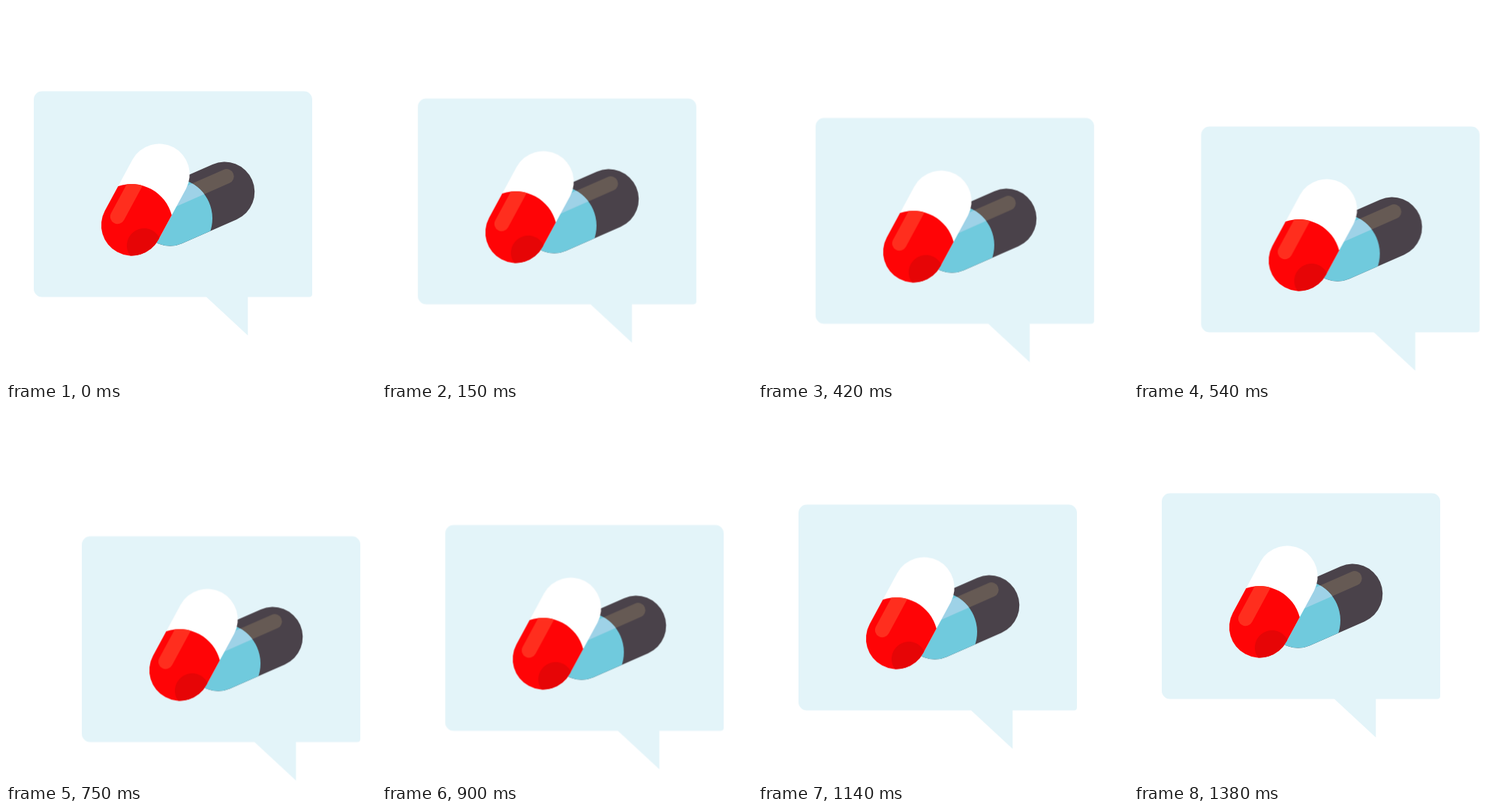
These frames come from a looping animation (493x498 px, 1.5 s). An HTML page:

```html
<!DOCTYPE html>
<html lang="en">
<head>
<meta charset="utf-8">
<title>Capsules</title>
<style>
  html, body {
    margin: 0;
    width: 100%;
    height: 100%;
    overflow: hidden;
    background: #fff;
  }
  svg {
    display: block;
    width: 493px;
    height: 498px;
  }
  .bubble {
    animation: drift 1500ms infinite;
  }
  /* out until 715 ms, back by 1380 ms, then rest */
  @keyframes drift {
    0% {
      transform: translate(0, 0);
      animation-timing-function: cubic-bezier(.167, 0, .833, 1);
    }
    47.667% {
      transform: translate(65.6px, 58.7px);
      animation-timing-function: cubic-bezier(.167, 0, .69, 1);
    }
    92%, 100% {
      transform: translate(0, 0);
    }
  }
  .shine {
    fill: none;
    stroke-width: 19.5;
    stroke-linecap: round;
  }
</style>
</head>
<body>
<svg viewBox="0 0 493 498">
  <defs>
    <rect id="backPill" x="-40" y="-40" width="159.7" height="80" rx="40"/>
    <circle id="blueCap" cx="1.1" cy="4.2" r="54"/>
    <path id="redCap" d="M-40.6 0A40.6 40.6 0 0 0 40.6 0V-37A55.6 55.6 0 0 0 -40.6 -37Z"/>
    <path id="backShine" d="M-10 -17.9H90.4"/>
    <clipPath id="inBack"><use href="#backPill"/></clipPath>
    <clipPath id="inBlue"><use href="#blueCap"/></clipPath>
    <clipPath id="inRed"><use href="#redCap"/></clipPath>
  </defs>

  <g class="bubble">
    <path fill="#e3f4f9" d="M48 113.5H397a11 11 0 0 1 11 11V383.5a4 4 0 0 1 -4 4H322.3V438.7L267 387.5H48a11 11 0 0 1 -11 -11V124.5a11 11 0 0 1 11 -11Z"/>

    <g transform="translate(218.3 279.6) rotate(-23.7)">
      <use href="#backPill" fill="#4a424a"/>
      <use href="#backShine" class="shine" stroke="#665a54"/>
      <g clip-path="url(#inBack)">
        <use href="#blueCap" fill="#70cadd"/>
        <g clip-path="url(#inBlue)">
          <use href="#backShine" class="shine" stroke="#9ed2e7"/>
        </g>
      </g>
    </g>

    <g transform="translate(167.5 291.8) rotate(28.4)">
      <rect x="-40.6" y="-117.6" width="81.2" height="158.2" rx="40.6" fill="#fff"/>
      <use href="#redCap" fill="#ff0406"/>
      <g clip-path="url(#inRed)">
        <path class="shine" stroke="#ff2e1e" d="M-22 -1.1V-70"/>
        <circle cx="27.4" cy="16.1" r="23" fill="#e60506"/>
      </g>
    </g>
  </g>
</svg>
</body>
</html>
```
